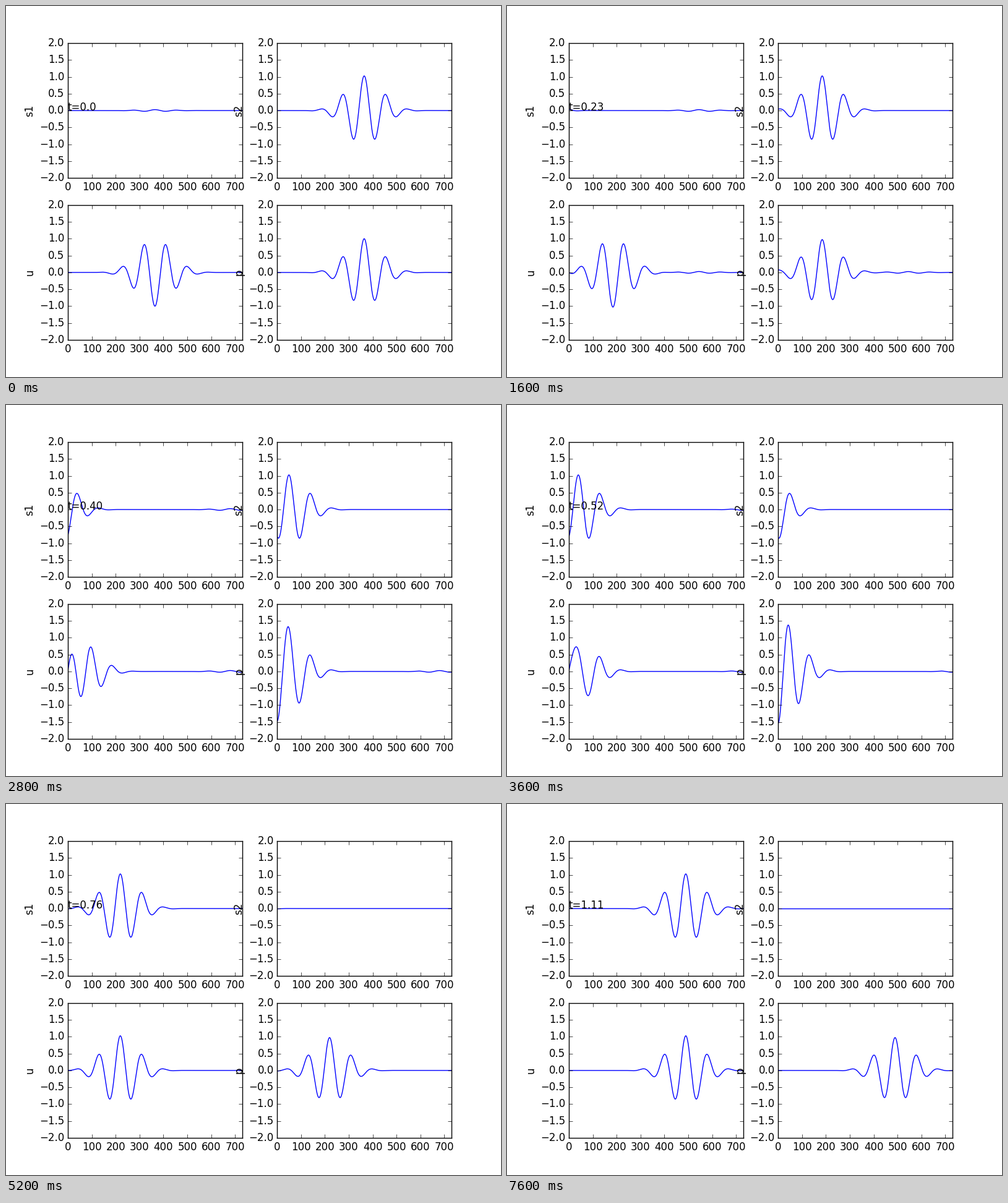
Recreate the animation shown at these times as a matplotlib script. Size 800 px wide and 600 px high, loop 8 s.

```python
import numpy as np
import matplotlib.pyplot as plt
from matplotlib.animation import FuncAnimation

plt.style.use("classic")
plt.rcParams.update({
    "font.family": "DejaVu Sans",
    "figure.facecolor": "white",
    "figure.dpi": 100,
    "savefig.dpi": 100,
    "savefig.facecolor": "white",
})

FRAMES, INTERVAL = 20, 400
CELLS = 729
STEPS = 45                        # cells travelled per frame
DENSITY, STIFFNESS = 0.9, 1.0
SPEED = np.sqrt(STIFFNESS / DENSITY)
IMPEDANCE = np.sqrt(STIFFNESS * DENSITY)
RIGHT_AMP = (1 / IMPEDANCE - 1) / 2
LEFT_AMP = (1 / IMPEDANCE + 1) / 2
CENTRE = CELLS / 2
WALL_LAG = 1                      # one-step delay at the reflecting wall

index = np.arange(CELLS + 1)


def packet(centre):
    d = (index - centre) / CELLS
    return np.exp(-50 * d**2) * np.cos(50 * d)


def fields(shift):
    """Right- and left-going waves, then velocity and pressure."""
    s1 = (RIGHT_AMP * packet(CENTRE + shift)
          + LEFT_AMP * packet(shift - CENTRE - WALL_LAG))
    s2 = LEFT_AMP * packet(CENTRE - shift)
    return s1, s2, s1 - s2, IMPEDANCE * (s1 + s2)


fig, axes = plt.subplots(2, 2, figsize=(8, 6), dpi=100)
lines = []
for ax, name in zip(axes.flat, ("s1", "s2", "u", "p")):
    ax.set_xlim(0, CELLS + 1)
    ax.set_ylim(-2, 2)
    ax.set_ylabel(name)
    lines += ax.plot(index, np.zeros(CELLS + 1), color="blue", lw=1)
clock = axes[0, 0].text(0, 0, "")


def update(frame):
    shift = frame * STEPS
    for line, values in zip(lines, fields(shift)):
        line.set_ydata(values)
    # The clock is cut to four characters, not rounded.
    clock.set_text("t=" + str(float(shift / CELLS / SPEED))[:4])
    return [*lines, clock]


anim = FuncAnimation(fig, update, frames=FRAMES, interval=INTERVAL,
                     repeat=True, repeat_delay=0)
plt.show()
```
